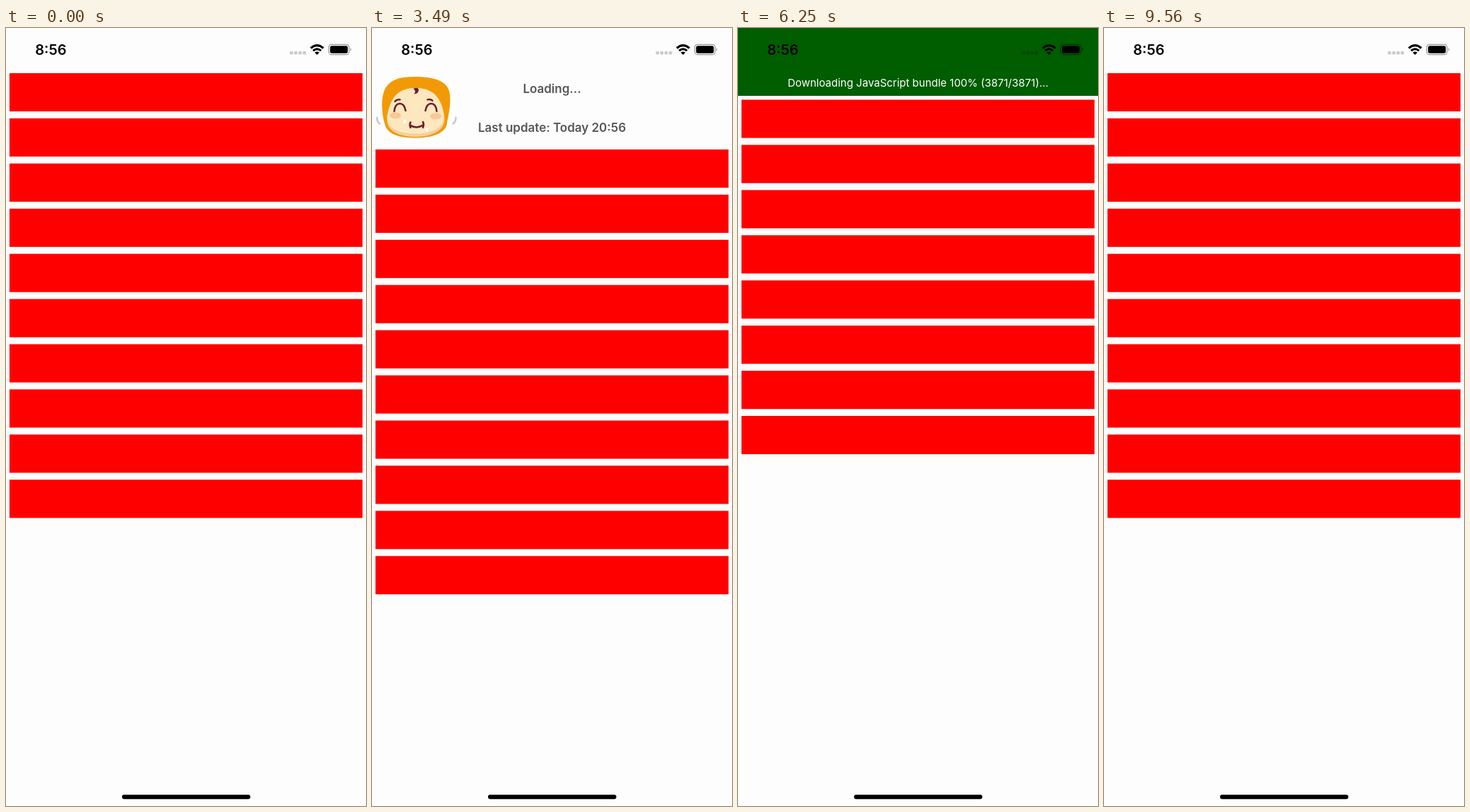
An HTML page that plays this animation: 509x1101 px, repeating every 9.6 s.

```html
<!DOCTYPE html>
<html lang="en">
<head>
<meta charset="utf-8">
<title>Pull to refresh</title>
<style>
  html, body { margin: 0; width: 100%; height: 100%; overflow: hidden; background: #fdfdfd; }
  svg { display: block; width: 100%; height: 100%; }
  text { font-family: Inter, Roboto, sans-serif; }
  .label { font-size: 17px; font-weight: 600; fill: #565656; text-anchor: middle; }
  .line { fill: none; stroke: #6f1d2b; stroke-width: 2.5; stroke-linecap: round; }
  .cheek { fill: #f8c896; }
  .hair { fill: #f29a06; }
  .skin { fill: #fde7bf; }
  .shade { fill: #f3cf9e; }
  .mark { fill: none; stroke: #c9c9cb; stroke-width: 2.6; stroke-linecap: round; }
</style>
</head>
<body>
<svg viewBox="0 0 509 1101">
  <defs>
    <clipPath id="safe"><rect y="59" width="509" height="1042"/></clipPath>
    <path id="curl" d="M59 128 Q66 125 66.5 130 Q66 135 60 135.5 Q63.500 131.500 59 128Z" fill="#6f1d2b"/>
  </defs>
  <rect width="509" height="1101" fill="#fdfdfd"/>

  <g id="screen" clip-path="url(#safe)">
    <!-- y = 0 is the top of the first row -->
    <g id="scroll">
      <g id="happy" transform="translate(0 -214)">
        <path class="hair" d="M15 158C13 126 23 111 60 111C98 111 112 121 111 143C111 158 107 172 106 180C101 193 82 197.500 62 197.500C42 197.500 26 194 20 182C17 174 15.500 166 15 158Z"/>
        <path class="shade" d="M22 170C27 139 39 127 62 127C89 127 99 143 103 168C105 188 84 196 62 196C41 196 20 189 22 170Z"/>
        <path class="skin" d="M22 166C27 138 39 127 62 127C89 127 99 143 102 165C104 184 84 191.500 62 191.500C41 191.500 20 185 22 166Z"/>
        <use href="#curl"/>
        <ellipse class="cheek" cx="33.500" cy="166" rx="8" ry="4.500"/>
        <ellipse class="cheek" cx="90.500" cy="167" rx="8" ry="4.500"/>
        <path class="line" d="M32 160Q33 149 40 149Q46 149 48 159M76 159Q78 149 84 149Q91 149 92 160M33 146Q36 142.500 40 143.500M79 143.500Q83 142 86 145"/>
        <path id="mouth" class="line" stroke-width="2" d="M54 178.500Q63 184.500 73 178.500M55 174.500Q53 178 55 182M72.500 174Q74.500 178 72.500 182"/>
        <path d="M46 171l3 2-2 5-3-2zM77 183l3 1-1 5-3-2z" fill="#fff"/>
      </g>
      <g id="marks" transform="translate(0 -214)">
        <path id="leftMark" class="mark" d="M7 169Q7 175 11 177.500"/>
        <path id="rightMark" class="mark" d="M118.500 169Q118.500 175 114.500 177.500"/>
      </g>
      <g id="calm" transform="translate(0 -169)">
        <path class="hair" d="M15 115C14 86 25 72 62 72C99 72 112 84 112 113C112 145 92 158 64 158C34 158 15 144 15 115Z"/>
        <path class="shade" d="M26 121C25 99 39 87 62 87C88 87 99 100 100 121C101 143 86 154.500 63 154.500C40 154.500 26 143 26 121Z"/>
        <path class="skin" d="M26 118C25 97 39 87 62 87C88 87 99 98 100 118C101 139 86 150 63 150C40 150 26 139 26 118Z"/>
        <use href="#curl" y="-41"/>
        <ellipse class="cheek" cx="37" cy="125" rx="7" ry="3.800"/>
        <ellipse class="cheek" cx="87" cy="124" rx="7" ry="3.800"/>
        <path class="line" d="M29 114Q39 110.500 50 112M79 112.500Q90 110.500 102 112.500M37 105Q39 103 42 103.800M82 104Q86 103 88 106"/>
        <path d="M56 133.500Q64 136 72 134Q70 139 63 138.500Q58 138 56 133.500Z" fill="#dc7486"/>
      </g>
      <text id="state" class="label" x="254.500" y="-79.500"></text>
      <text class="label" x="254.500" y="-25.400">Last update: Today 20:56</text>
      <g id="rows" fill="#f00"></g>
    </g>
  </g>

  <g id="banner">
    <rect width="509" height="96" fill="#005d00"/>
    <text id="progress" x="254.500" y="83" font-size="15" fill="#fff" text-anchor="middle"></text>
  </g>

  <text x="41.300" y="37.600" font-size="20" font-weight="600">8:56</text>
  <g fill="#000" fill-opacity=".2">
    <rect x="401.300" y="33" width="4.600" height="4.600" rx="1"/>
    <rect x="407.400" y="33" width="4.600" height="4.600" rx="1"/>
    <rect x="413.500" y="33" width="4.600" height="4.600" rx="1"/>
    <rect x="419.600" y="33" width="4.600" height="4.600" rx="1"/>
  </g>
  <path d="M430.900 28.500Q439.800 20.800 448.700 28.500M434.200 32.200Q439.800 27.400 445.400 32.200" fill="none" stroke="#000" stroke-width="3"/>
  <path d="M439.800 38L436.500 34.800Q439.800 32 443.100 34.800Z"/>
  <rect x="456.300" y="23.300" width="28.800" height="14.400" rx="4.200" fill="none" stroke="#000" stroke-opacity=".4" stroke-width="1.200"/>
  <rect x="458.200" y="25.200" width="25" height="10.600" rx="2.500"/>
  <path d="M486.800 28Q489.200 30.500 486.800 33Z" fill-opacity=".45"/>
  <rect x="164" y="1085" width="181.500" height="6.200" rx="3.100"/>
</svg>

<script>
const LOOP = 9600, HEADER = 108, ROW_TOP = 63.9, PITCH = 63.93;
const RELOAD = 5820, MOUNTED = 6100, ALL_ROWS = 6290, SLIDE = 6420, BUNDLE = 3871;
const $ = id => document.getElementById(id);

// [time, scroll offset], eased between neighbours
const PULL = [
  [0, 0], [1490, 0], [1840, 163], [2215, HEADER],
  [5235, HEADER], [5610, 0], [6102, 0], [6477, HEADER],
  [9185, HEADER], [9560, 0], [LOOP, 0]
];
const LOADING = [[1840, 5235], [MOUNTED, 9185]];

const clamp = x => Math.min(1, Math.max(0, x));
const part = (t, from, to) => clamp((t - from) / (to - from));
const ease = p => p * p * (3 - 2 * p);
const show = (el, on) => el.setAttribute('visibility', on ? 'inherit' : 'hidden');
const move = (el, x, y) => el.setAttribute('transform', `translate(${x} ${y})`);

const rows = Array.from({ length: 10 }, (_, i) => {
  const row = document.createElementNS('http://www.w3.org/2000/svg', 'rect');
  const box = { x: 4.9, y: i * PITCH, width: 499.2, height: 54.1 };
  for (const key in box) row.setAttribute(key, box[key]);
  return $('rows').appendChild(row);
});

function offsetAt(t) {
  const i = PULL.findIndex(([time]) => time > t);
  const [t0, a] = PULL[i - 1], [t1, b] = PULL[i];
  return a + (b - a) * ease(part(t, t0, t1));
}

function drawHeader(t, offset) {
  const loading = LOADING.some(([from, to]) => t >= from && t < to);
  const pose = Math.floor((t + 210) / 100) % 3;   // chewing cycle of three poses
  show($('happy'), loading);
  show($('calm'), !loading);
  show($('marks'), loading && pose > 0);
  move($('happy'), pose ? -0.5 : 0, -214);
  move($('mouth'), pose === 2 ? 1 : 0, pose ? 1 : 0);
  move($('leftMark'), pose === 2 ? -3 : 0, 0);
  move($('rightMark'), pose === 2 ? 2 : 0, 0);
  $('state').textContent = loading ? 'Loading...'
    : offset > HEADER ? 'Release to refresh' : 'Pull down to refresh';
}

function drawBanner(t) {
  const p = part(t, RELOAD, 6080);
  show($('banner'), t >= RELOAD && t < SLIDE + 260);
  move($('banner'), 0, -96 * ease(part(t, SLIDE, SLIDE + 250)));
  $('progress').textContent =
    `Downloading JavaScript bundle ${Math.floor(p * 100)}% (${Math.floor(p * BUNDLE)}/${BUNDLE})...`;
}

function draw(t) {
  const offset = offsetAt(t);
  move($('scroll'), 0, ROW_TOP + offset);
  show($('screen'), t < RELOAD || t >= MOUNTED);
  rows.forEach((row, i) => show(row, i < 8 || t < RELOAD || t >= ALL_ROWS));
  drawHeader(t, offset);
  drawBanner(t);
}

const start = performance.now();
function tick() {
  draw((performance.now() - start) % LOOP);
  requestAnimationFrame(tick);
}
tick();
</script>
</body>
</html>
```
